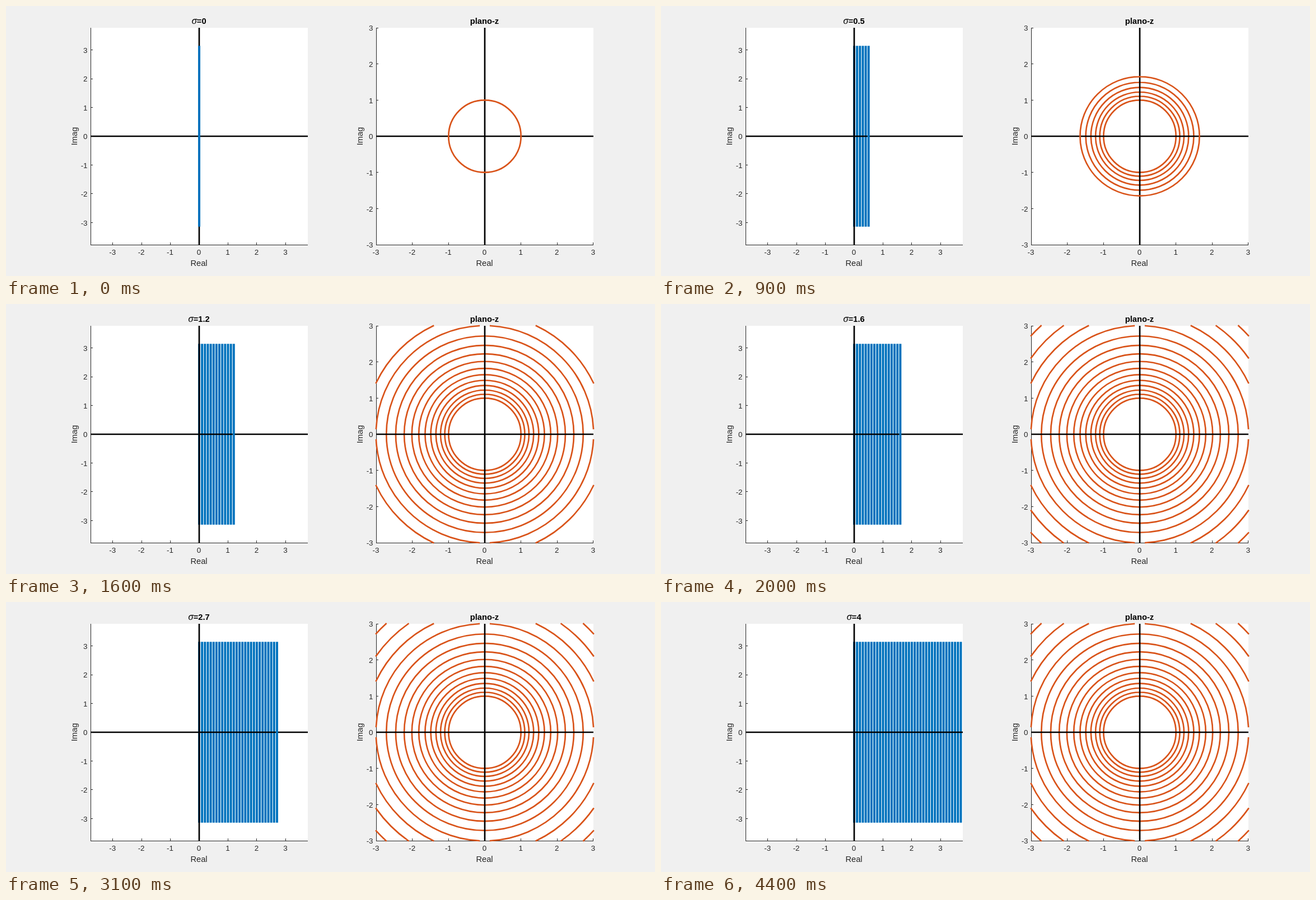
An HTML page that plays this animation: 1159 px wide and 483 px high, repeating every 4500 ms.

```html
<!DOCTYPE html>
<html lang="es">
<head>
<meta charset="utf-8">
<title>plano-z</title>
<style>
  html, body { margin: 0; width: 100%; height: 100%; overflow: hidden; background: #f0f0f0; }
  svg { display: block; width: 100%; height: 100%; font-family: "Liberation Sans", Arial, sans-serif; }
  text { fill: #262626; text-anchor: middle; font-size: 13.33px; }
  .label { font-size: 14.67px; }
  .title { font-size: 14.67px; font-weight: bold; fill: #000; }
  .sigma { font-family: "Noto Serif", serif; font-style: italic; font-weight: 500; font-size: 15.5px; }
  .ytick { text-anchor: end; }
  path { fill: none; }
  .axes { stroke: #000; stroke-width: 2.67; }
  .ruler { fill: #262626; }
  .line { stroke: #0072bd; stroke-width: 4; }
  .ring { stroke: #d95319; stroke-width: 2.67; stroke-linecap: square; }
</style>
</head>
<body>
<svg viewBox="0 0 1159 483"></svg>
<script>
const LOOP = 4500, HOLD = 400, STEP = 100;
const SIZE = 388, TOP = 39, CY = 233;
const svg = document.querySelector('svg');

function add(name, attrs, text) {
  const el = document.createElementNS('http://www.w3.org/2000/svg', name);
  for (const key in attrs) el.setAttribute(key, attrs[key]);
  if (text !== undefined) el.textContent = text;
  svg.appendChild(el);
  return el;
}

const rect = (x, y, width, height, cls) => add('rect', { x, y, width, height, class: cls });
const label = (x, y, text, cls) => add('text', { x, y, class: cls }, text);

// Builds one plot; curves below the axes are past steps, above is the newest.
function plot(left, limit, cls) {
  const cx = left + SIZE / 2, unit = SIZE / 2 / limit;
  const bottom = TOP + SIZE;
  rect(left, TOP, SIZE, SIZE + 1, '').setAttribute('fill', '#fff');
  rect(left, TOP, 1, SIZE + 1, 'ruler');
  rect(left, bottom, SIZE, 1, 'ruler');
  for (let v = -3; v <= 3; v++) {
    const x = cx + v * unit, y = CY - v * unit;
    rect(Math.min(Math.floor(x), left + SIZE - 1), bottom - 4, 1, 4, 'ruler');
    rect(left, Math.min(Math.floor(y), bottom), 4, 1, 'ruler');
    label(x - 0.5, 445, v);
    label(left - 5.5, y + 5.3, v, 'ytick');
  }
  label(cx - 0.5, 465, 'Real', 'label');
  add('text', { transform: `translate(${left - 24} ${CY}) rotate(-90)`, class: 'label' }, 'Imag');
  const past = add('path', { class: cls });
  add('path', {
    class: 'axes',
    d: `M${left} ${CY}h${SIZE}M${cx} ${TOP}v${SIZE}`
  });
  const newest = add('path', { class: cls });
  return { cx, unit, limit, past, newest, title: label(cx - 0.5, 32, '', 'title') };
}

const sPlane = plot(151, 1.2 * Math.PI, 'line');
const zPlane = plot(661, 3, 'ring');
zPlane.title.textContent = 'plano-z';
sPlane.title.innerHTML = '<tspan class="sigma">σ</tspan><tspan></tspan>';
const value = sPlane.title.lastChild;

function linePath(sigma) {
  const { cx, unit, limit } = sPlane;
  if (sigma > limit) return '';
  const h = Math.PI * unit;
  return `M${cx + sigma * unit} ${CY - h}v${2 * h}`;
}

// Circle of radius e^sigma, cut where its centre line leaves the square.
function ringPath(sigma) {
  const { cx, unit, limit } = zPlane;
  const r = Math.exp(sigma), px = r * unit;
  if (r >= limit * Math.SQRT2) return '';
  const cut = r > limit ? Math.acos(limit / r) : 0;
  const at = a => `${cx + px * Math.cos(a)} ${CY + px * Math.sin(a)}`;
  let d = '';
  for (let q = 0; q < 4; q++) {
    const a = q * Math.PI / 2;
    d += `M${at(a + cut)}A${px} ${px} 0 0 1 ${at(a + Math.PI / 2 - cut)}`;
  }
  return d;
}

function show(n) {
  for (const [view, path] of [[sPlane, linePath], [zPlane, ringPath]]) {
    let past = '';
    for (let i = 0; i < n; i++) past += path(i / 10);
    view.past.setAttribute('d', past);
    view.newest.setAttribute('d', path(n / 10));
  }
  value.textContent = '=' + n / 10;
}

let shown = -1;
function frame(now) {
  const n = Math.max(0, Math.floor((now % LOOP - HOLD) / STEP));
  if (n !== shown) show(shown = n);
  requestAnimationFrame(frame);
}
show(0);
requestAnimationFrame(frame);
</script>
</body>
</html>
```
